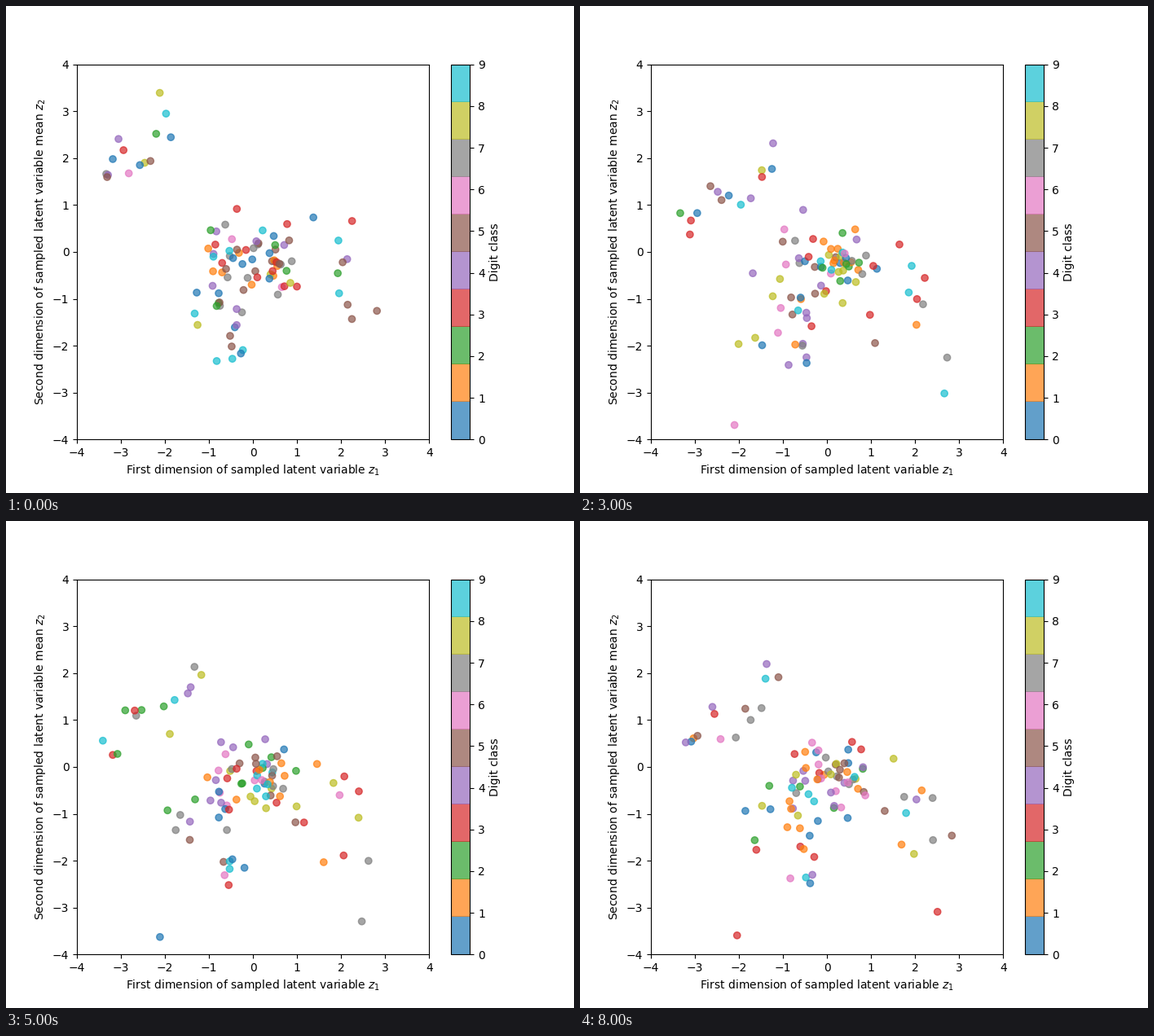
A matplotlib script for the animation above (9 s loop, 697 by 598 pixels).

```python
import numpy as np
import matplotlib.pyplot as plt
from matplotlib.animation import FuncAnimation

EPOCHS = 9
SEED = 11
ALPHA = 0.7

# Clusters: size, centre early and late in training, spread.
CLUSTERS = [
    (40, (0.20, -0.15), (0.25, -0.20), (0.45, 0.45)),    # core
    (20, (-0.70, -0.30), (-0.65, -0.45), (0.25, 0.60)),  # left of the core
    (7, (-0.42, -1.90), (-0.50, -2.00), (0.22, 0.30)),   # below
    (6, (-1.10, -0.80), (-1.60, -1.20), (0.30, 0.65)),   # lower left
    (11, (1.80, -0.60), (1.85, -1.10), (0.55, 0.75)),    # right
    (1, (-0.35, -2.30), (-2.00, -3.70), (0.15, 0.15)),   # far strays
    (1, (2.40, -1.60), (2.70, -3.40), (0.30, 0.25)),
]

# Upper left arm, scattered along a line whose ends move.
ARM_SIZE = 14
ARM_EARLY = np.array([(-3.50, 1.50), (-1.70, 2.70)])
ARM_LATE = np.array([(-3.40, 0.45), (-1.00, 1.80)])
ARM_SPREAD = np.array([0.15, 0.38])


def scatter(rng, n):
    """Normal pairs with softly limited tails."""
    return 2.2 * np.tanh(rng.standard_normal((n, 2)) / 2.2)


def lerp(a, b, t):
    return (1 - t) * np.asarray(a) + t * np.asarray(b)


def batch(epoch):
    """Latent positions and digit classes of one epoch."""
    fixed = np.random.default_rng(SEED)
    noise = np.random.default_rng([SEED, epoch])
    late = 1 - np.exp(-1.5 * epoch)

    def cloud(n, centre, spread):
        return centre + spread * (0.8 * scatter(fixed, n)
                                  + 0.6 * scatter(noise, n))

    groups = [cloud(n, lerp(early, end, late), lerp(0.8, 1, late) * np.array(spread))
              for n, early, end, spread in CLUSTERS]
    first, last = lerp(ARM_EARLY, ARM_LATE, late)
    along = np.linspace(0, 1, ARM_SIZE)[:, None]
    groups.append(cloud(ARM_SIZE, lerp(first, last, along), ARM_SPREAD))

    points = noise.permutation(np.vstack(groups))
    return points, noise.integers(0, 10, len(points))


fig, ax = plt.subplots(figsize=(6.97, 5.98), dpi=100)
points, classes = batch(0)
dots = ax.scatter(*points.T, c=classes, cmap="tab10", vmin=0, vmax=9,
                  alpha=ALPHA)
ax.set(xlim=(-4, 4), ylim=(-4, 4),
       xlabel="First dimension of sampled latent variable $z_1$",
       ylabel="Second dimension of sampled latent variable mean $z_2$")
bar = fig.colorbar(dots, ax=ax, label="Digit class")

# Neighbouring translucent bands overlap by one pixel.
pixel = 9 / bar.ax.get_window_extent().height
for k in range(1, 10):
    bar.ax.axhspan(0.9 * k, 0.9 * k + pixel, color=dots.cmap(k - 1),
                   alpha=ALPHA, lw=0, zorder=-1)


def draw(epoch):
    points, classes = batch(epoch)
    dots.set_offsets(points)
    dots.set_array(classes)
    return dots,


anim = FuncAnimation(fig, draw, frames=EPOCHS, interval=1000, repeat=True)
plt.show()
```
